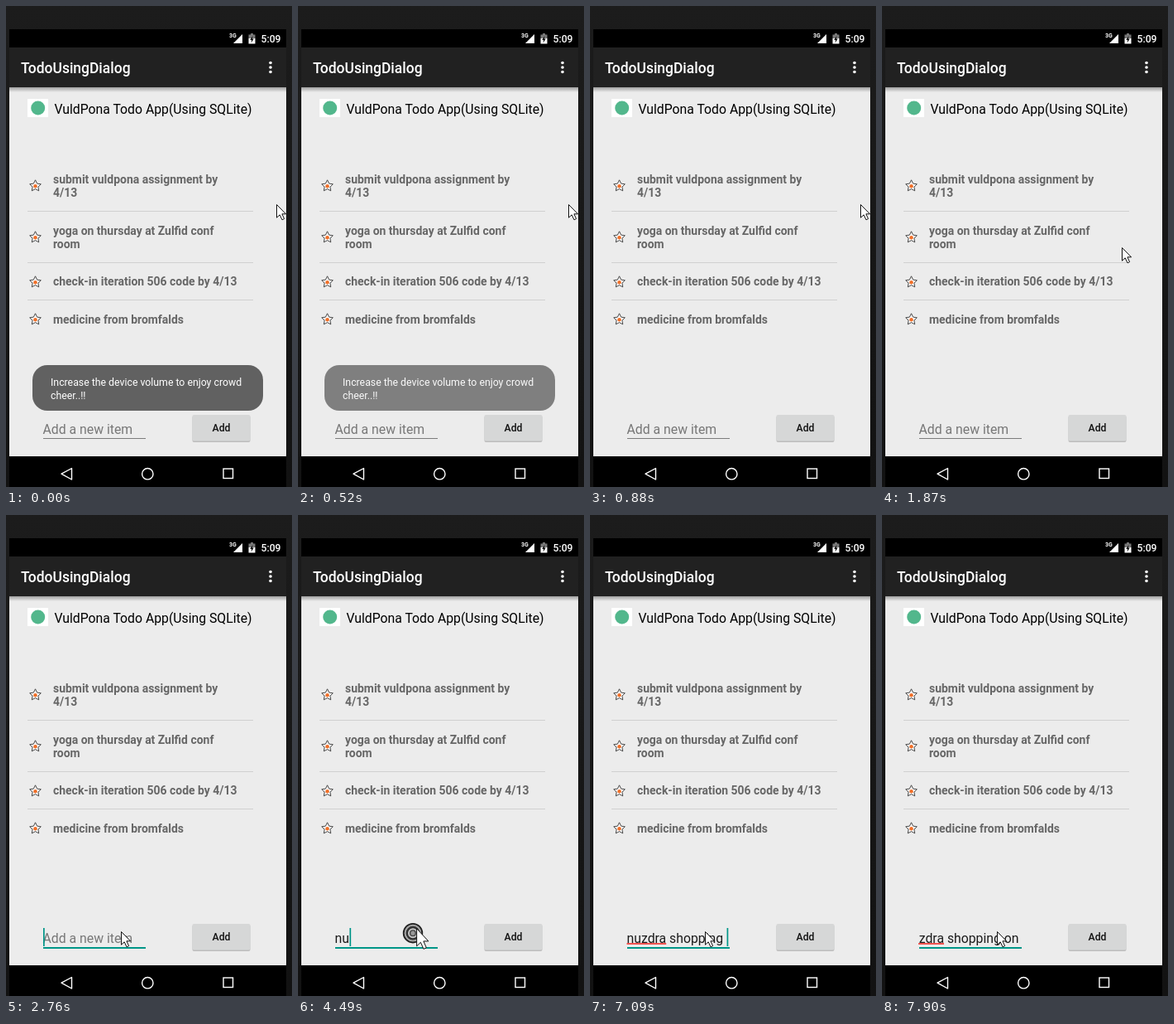
Animation, 346 px wide and 580 px high, one loop 8000 ms. Source, as an HTML page:

```html
<!DOCTYPE html>
<html lang="en">
<head>
<meta charset="utf-8">
<title>Todo app</title>
<style>
  html, body { margin: 0; width: 100%; height: 100%; overflow: hidden; background: #1a1a1a; }
  svg { display: block; width: 346px; height: 580px; font-family: Roboto, "Noto Sans", sans-serif; }
  text { white-space: pre; }
  .items { font-size: 13.95px; font-weight: 700; fill: #666; }
  .field { font-size: 15.8px; }
  .outline { fill: none; stroke: #fff; stroke-width: 1.4; }
  .toast, .focus, .pointer, .arrow, .busy { animation: 8s step-end infinite; }
  .toast { animation-name: fade; }
  .focus { animation-name: focus; }
  .pointer { animation-name: travel; }
  .arrow { animation-name: arrow; }
  .busy { animation-name: busy; }

  @keyframes fade {
    0% { opacity: 1; } 6.5% { opacity: .78; } 8% { opacity: .53; }
    9.5% { opacity: .24; } 11%, 100% { opacity: 0; }
  }
  @keyframes focus { 0% { opacity: 0; } 34.5%, 100% { opacity: 1; } }
  @keyframes travel {
    0% { transform: translate(327px, 239px); }
    19.875% { transform: translate(317px, 253px); }
    21.75% { transform: translate(290px, 291px); }
    23.5% { transform: translate(253px, 343px); }
    25.375% { transform: translate(213px, 398px); }
    27.25% { transform: translate(176px, 450px); }
    29% { transform: translate(149px, 488px); }
    30.875%, 100% { transform: translate(139px, 502px); }
  }
  @keyframes busy {
    0% { opacity: 0; } 50.25% { opacity: 1; } 64.75% { opacity: 0; }
    68.25% { opacity: 1; } 80.25%, 100% { opacity: 0; }
  }
  @keyframes arrow {
    0% { opacity: 1; } 50.25% { opacity: 0; } 64.75% { opacity: 1; }
    68.25% { opacity: 0; } 80.25%, 100% { opacity: 1; }
  }
</style>
</head>
<body>
<svg viewBox="0 0 346 580">
  <defs>
    <linearGradient id="bezel" x2="0" y2="1">
      <stop stop-color="#1c1c1c"/><stop offset="1" stop-color="#121212"/>
    </linearGradient>
    <linearGradient id="shade" x2="0" y2="1">
      <stop stop-color="#a0a0a0"/><stop offset="1" stop-color="#ececec"/>
    </linearGradient>
    <clipPath id="fieldClip"><rect x="44" y="494" width="126" height="28"/></clipPath>
    <path id="cursor" d="M.5 .5V16.2L4.2 12.8L7 18.8L9.6 17.6L6.9 11.8H11.6Z"
      fill="#fff" stroke="#111" stroke-linejoin="round" vector-effect="non-scaling-stroke"/>
    <g id="star">
      <path d="M0-7.2L2.1-2.9L6.8-2.2L3.4 1.1L4.2 5.8L0 3.6L-4.2 5.8L-3.4 1.1L-6.8-2.2L-2.1-2.9Z"
        fill="#fff" stroke="#333" stroke-width=".9" stroke-linejoin="round"/>
      <circle cy=".3" r="2.3" fill="#f0702a"/>
    </g>
  </defs>

  <rect width="346" height="580" fill="url(#bezel)"/>
  <rect x="4" y="28" width="335" height="552"/>
  <rect x="4" y="50" width="335" height="48" fill="#212121"/>
  <rect x="4" y="98" width="335" height="445" fill="#ececec"/>
  <rect x="4" y="98" width="335" height="6" fill="url(#shade)"/>

  <!-- status and action bars -->
  <g fill="#fff">
    <text x="270" y="38" font-size="7" font-weight="700">3G</text>
    <path d="M286 34V45H275Z"/>
    <path d="M296 33H299V34.5H301.5V39H293.5V34.5H296Z" fill="#777"/>
    <path d="M293.5 39H301.5V45.5H293.5Z"/>
    <path d="M298.5 36L295.3 41H297.2L296.5 44.5L299.8 39.5H297.8Z" fill="#000"/>
    <text x="308.5" y="44" font-size="12.2" font-weight="500">5:09</text>
    <text x="18" y="81" font-size="17.45" font-weight="500">TodoUsingDialog</text>
    <circle cx="320" cy="68.5" r="1.8"/><circle cx="320" cy="74" r="1.8"/><circle cx="320" cy="79.5" r="1.8"/>
  </g>

  <rect x="26" y="112" width="25" height="22" fill="#fff"/>
  <circle cx="38.7" cy="123" r="8.5" fill="#52b78c"/>
  <text x="58.5" y="129.5" font-size="15.77">VuldPona Todo App(Using SQLite)</text>

  <g class="items">
    <text x="57" y="214">submit vuldpona assignment by</text>
    <text x="57" y="230">4/13</text>
    <text x="57" y="276">yoga on thursday at Zulfid conf</text>
    <text x="57" y="292">room</text>
    <text x="57" y="337">check-in iteration 506 code by 4/13</text>
    <text x="57" y="383">medicine from bromfalds</text>
  </g>
  <use href="#star" x="35.5" y="217"/>
  <use href="#star" x="35.5" y="279"/>
  <use href="#star" x="35.5" y="333"/>
  <use href="#star" x="35.5" y="378"/>
  <path d="M26 247.5H299M26 309.5H299M26 354.5H299" stroke="#d0d0d0"/>

  <!-- entry field -->
  <path d="M45 521.5H169" stroke="#7c7c7c"/>
  <path class="focus" d="M45 522H169" stroke="#009688" stroke-width="2"/>
  <text id="hint" class="field" x="44.5" y="515.5" fill="#777">Add a new item</text>
  <g clip-path="url(#fieldClip)">
    <text id="entry" class="field" y="515.5" fill="#1c1c1c"></text>
    <rect id="typo" y="516" height="2" fill="#ef5350"/>
  </g>
  <rect id="caret" y="498" width="1.7" height="22" fill="#009688"/>

  <rect x="225.5" y="494" width="70" height="32" rx="2" fill="#bdbdbd"/>
  <rect x="225.5" y="493" width="70" height="31.5" rx="2" fill="#d6d7d7"/>
  <text x="260.5" y="513" text-anchor="middle" font-size="12.2" font-weight="500" fill="#111">Add</text>

  <g class="toast">
    <rect x="32" y="433" width="279" height="55" rx="18" fill="#616161"/>
    <g font-size="12.3" fill="#fff">
      <text x="54" y="458">Increase the device volume to enjoy crowd</text>
      <text x="54" y="474">cheer..!!</text>
    </g>
  </g>

  <!-- navigation bar -->
  <g class="outline">
    <path d="M79.5 557.5V571L67 564.2Z" stroke-linejoin="round"/>
    <circle cx="171.3" cy="564.2" r="6.7"/>
    <rect x="263" y="558" width="11.5" height="11.5"/>
  </g>

  <g class="pointer"><use class="arrow" href="#cursor"/></g>
  <g class="busy">
    <circle cx="139" cy="504.2" r="11.3" fill="#a8a8a8" stroke="#222" stroke-width="1.8"/>
    <circle cx="139" cy="504.2" r="7.2" fill="#c4c4c4" stroke="#333" stroke-width="2.4"/>
    <circle cx="139" cy="504.2" r="3.3" fill="#999" stroke="#444" stroke-width="1.4"/>
    <use href="#cursor" transform="translate(143 498) scale(1.28 1.35)"/>
  </g>
</svg>
<script>
  const LOOP = 8000, LEFT = 44.5, VISIBLE = 125, CARET_MAX = 168;
  const phrase = "nuzdra shopping on ";
  const wordLength = phrase.indexOf(" ");
  const keyTimes = [
    4330, 4490, 4630, 4780,
    5320, 5460, 5600, 5740, 5880, 6020, 6170,
    6290, 6420, 6550, 6680,
    7090, 7230, 7370, 7500
  ];
  const caretSpans = [[2760, 3340], [3870, 5180], [5320, 7900]];
  const [hint, entry, typo, caret] =
    ["hint", "entry", "typo", "caret"].map(id => document.getElementById(id));
  const show = (el, on) => el.setAttribute("visibility", on ? "visible" : "hidden");
  const start = performance.now();

  function draw() {
    const t = (performance.now() - start) % LOOP;
    const typed = keyTimes.filter(k => k <= t).length;
    entry.textContent = phrase.slice(0, typed);
    const width = typed ? entry.getComputedTextLength() : 0;
    const x = LEFT - Math.max(0, width - VISIBLE);
    entry.setAttribute("x", x);
    show(hint, !typed);

    const misspelt = typed > wordLength;
    show(typo, misspelt);
    if (misspelt) {
      typo.setAttribute("x", x);
      typo.setAttribute("width", entry.getSubStringLength(0, wordLength));
    }

    caret.setAttribute("x", Math.min(CARET_MAX, x + width + 0.5));
    show(caret, caretSpans.some(([on, off]) => t >= on && t < off));
    requestAnimationFrame(draw);
  }
  draw();
</script>
</body>
</html>
```
